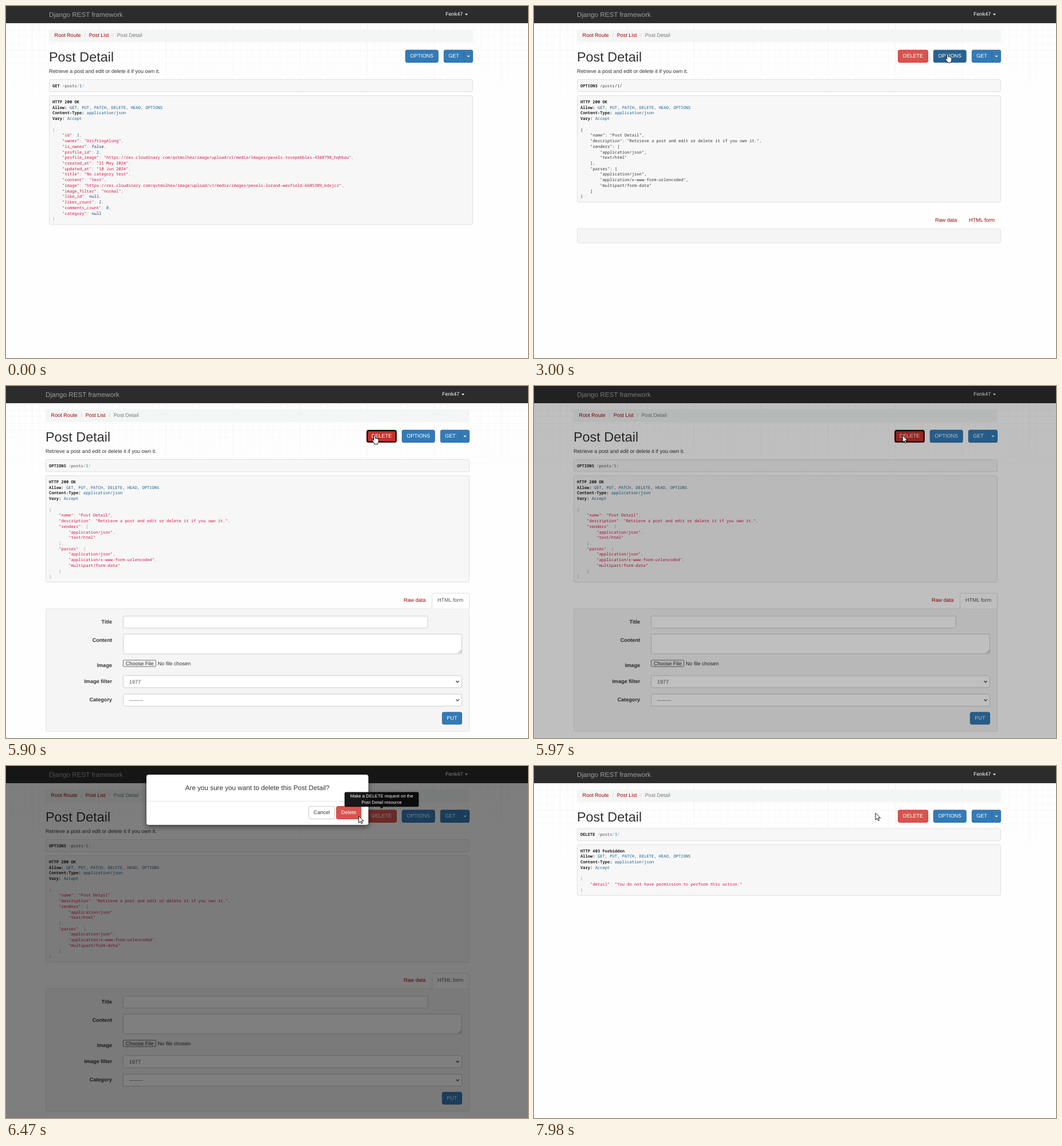
An HTML page for the animation above (8000 ms loop, 911 by 615 pixels).

```html
<!DOCTYPE html>
<html lang="en">
<head>
<meta charset="utf-8">
<title>Post Detail</title>
<style>
  html, body { margin: 0; width: 100%; height: 100%; overflow: hidden; background: #fefefe; }
  svg { display: block; }
  text { font: 9.09px "Liberation Sans", Arial, sans-serif; fill: #333; text-rendering: geometricPrecision; white-space: pre; }
  .mid { text-anchor: middle; }
  .end { text-anchor: end; }
  .b { font-weight: bold; }
  .white { fill: #fff; }
  .link { fill: #a30000; }
  .tip { font-size: 7.79px; }
  .code { font: 7.135px "Noto Sans Mono", "Liberation Mono", monospace; fill: #48484c; }
  .code .b { fill: #222; }
  .str { fill: #d14; }
  .lit { fill: #195f91; }
  .kwd { fill: #1e347b; }
  .pun { fill: #93a1a1; }
  .plain .str, .plain .pun, .plain .num { fill: #333; }
</style>
</head>
<body>
<svg id="stage" width="911" height="615" viewBox="0 0 911 615"></svg>
<script>
const LOOP = 8000;
const BLUE = ['#337ab7', '#286090', '#204d74'];
const RED = ['#d9534f', '#c9302c', '#ac2925'];

// ---- drawing helpers
const text = (x, y, s, cls = '', extra = '') => `<text x="${x}" y="${y}" class="${cls}" ${extra}>${s}</text>`;
const box = (x, y, w, h, fill, stroke = 'none', r = 2.6, extra = '') =>
  `<rect x="${x}" y="${y}" width="${w}" height="${h}" rx="${r}" fill="${fill}" stroke="${stroke}" ${extra}/>`;
const line = (x1, y1, x2, y2, c) => `<path d="M${x1} ${y1}L${x2} ${y2}" stroke="${c}"/>`;
const caret = (x, y) => `<path d="M${x - 2.6} ${y}h5.2l-2.6 2.6z" fill="#fff"/>`;
const group = (id, body, extra = '') => `<g id="${id}" ${extra}>${body}</g>`;
const button = (id, x, y, w, h, label, fill, stroke, cls = 'white') =>
  box(x, y, w, h, fill, stroke, 2.6, `id="${id}"`) + text(x + w / 2, y + h / 2 + 2.7, label, cls + ' mid');

// ---- code blocks
const TOKEN = /("[^"]*")|(\d+)|(true|false|null)|([{}\[\]:,\/]+)/g;
const paint = s => s.replace(TOKEN, (m, str, num, kwd) =>
  `<tspan class="${str ? 'str' : num ? 'lit num' : kwd ? 'kwd' : 'pun'}">${m}</tspan>`);
const bold = s => `<tspan class="b">${s}</tspan>`;
const lit = s => `<tspan class="lit">${s}</tspan>`;
const pre = (y, h, lines) => box(75.5, y, 739, h, '#f7f7f7', '#dfdfe2') +
  lines.map((s, i) => text(81, y + 13.2 + i * 9.735, s, 'code', 'xml:space="preserve"')).join('');

function response(y, method, status, data) {
  const lines = [
    bold('HTTP ' + status),
    bold('Allow:') + lit(' GET, PUT, PATCH, DELETE, HEAD, OPTIONS'),
    bold('Content-Type:') + lit(' application/json'),
    bold('Vary:') + lit(' Accept'), '',
    ...JSON.stringify(data, null, 4).split('\n').map(paint)
  ];
  return pre(y, 21.2, [bold(method) + ' ' + paint('/posts/1/')]) +
    pre(y + 28.2, lines.length * 9.735 + 11, lines);
}

const media = 'https://res.cloudinary.com/qvtmolhea/image/upload/v1/media/images/';
const post = {
  id: 1, owner: 'DriftingAlong', is_owner: false, profile_id: 2,
  profile_image: media + 'pexels-tovepebbles-4348798_hqhbau',
  created_at: '21 May 2024', updated_at: '10 Jun 2024',
  title: 'No category test', content: 'test',
  image: media + 'pexels-lorand-wexfield-6605309_kdxjcz',
  image_filter: 'normal', like_id: null, likes_count: 2, comments_count: 0, category: null
};
const intro = 'Retrieve a post and edit or delete it if you own it.';
const options = {
  name: 'Post Detail', description: intro,
  renders: ['application/json', 'text/html'],
  parses: ['application/json', 'application/x-www-form-urlencoded', 'multipart/form-data']
};
const denied = { detail: 'You do not have permission to perform this action.' };

// ---- page parts
function grid() {
  let s = '';
  for (let i = 0; i < 78; i++) {
    const x = Math.round(45 + (i - 4) * 11.7) + .5;
    s += line(x, 30, x, 178, i % 10 === 4 ? '#ededed' : '#f7f7f7');
  }
  for (let i = 0; i < 10; i++) {
    const y = Math.round(30 + i * 11.7) + .5;
    s += line(0, y, 911, y, i === 9 || i === 4 ? '#f2f2f2' : '#f7f7f7');
  }
  return `<defs><linearGradient id="fade" x2="0" y2="1"><stop stop-color="#fefefe" stop-opacity="0"/>
    <stop offset="1" stop-color="#fefefe"/></linearGradient>
    <filter id="shadow" x="-10%" y="-30%" width="120%" height="180%">
    <feDropShadow dx="0" dy="3" stdDeviation="5" flood-opacity=".5"/></filter></defs>` +
    s + '<rect y="30" width="911" height="150" fill="url(#fade)"/>';
}

const navbar = text(75, 18.8, 'Django REST framework', '', 'style="font-size:11.68px;fill:#9d9d9d"') +
  text(797.3, 17.4, 'Fenk47', 'white end') + caret(803.5, 13.6);

const header = box(75, 41, 740, 22.3, '#f4f5f5') +
  text(84.6, 54, 'Root Route', 'link') + text(136.6, 54, '/', '', 'style="fill:#ccc"') +
  text(144.7, 54, 'Post List', 'link') + text(185.6, 54, '/', '', 'style="fill:#ccc"') +
  text(193.8, 54, 'Post Detail', '', 'style="fill:#777"') +
  text(75, 97, 'Post Detail', '', 'style="font-size:23.4px"') +
  group('remove', button('removeBtn', 635.5, 77, 52, 21.5, 'DELETE', RED[0], '#d43f3a')) +
  button('optionsBtn', 697.2, 77, 57, 21.5, 'OPTIONS', BLUE[0], '#2e6da4') +
  box(764.3, 77, 50.3, 21.5, BLUE[0], '#2e6da4') + line(799.2, 77, 799.2, 98.5, '#2e6da4') +
  text(781.6, 90.4, 'GET', 'white mid') + caret(807, 86.8);

const field = (y, h, w = 591) => box(204.5, y, w, h, '#fff', '#ccc');
const select = (y, value) => field(y, 21) + text(215, y + 13.7, value, '', 'style="fill:#555"') +
  `<path d="M785.5 ${y + 9.3}l2.6 2.6 2.6-2.6" fill="none" stroke="#333" stroke-width="1.3"/>`;
const labels = [['Title', 415], ['Content', 447], ['Image', 491.3], ['Image filter', 519], ['Category', 551]];

const tabs = `<path d="M743.5 389v-24.4q0-2.6 2.6-2.6h60q2.6 0 2.6 2.6v24.4" fill="#fefefe" stroke="#ddd"/>`;
const form = labels.map(([s, y]) => text(185, y, s, 'b end')).join('') +
  field(402, 21, 531.5) + field(433.5, 34.5) +
  '<path d="M789 467l6-6M792 467l3-3" stroke="#777" stroke-width=".8"/>' +
  box(204.5, 479, 57, 11.3, '#efefef', '#767676', 1) + text(209, 488, 'Choose File') + text(264.8, 488, 'No file chosen') +
  select(506, '1977') + select(538.3, '--------') +
  button('put', 761.3, 570, 34.2, 21, 'PUT', BLUE[0], '#2e6da4');

const modal = box(245, 15, 387.5, 88, '#fff', 'rgba(0,0,0,.2)', 4, 'filter="url(#shadow)"') +
  text(438.7, 42, 'Are you sure you want to delete this Post Detail?', 'mid', 'style="font-size:11.68px"') +
  line(245, 61.5, 632.5, 61.5, '#e5e5e5') +
  button('cancel', 528.5, 70.5, 45, 22, 'Cancel', '#fff', '#ccc', '') +
  button('confirm', 576.7, 70.5, 43, 22, 'Delete', RED[0], '#d43f3a');

const tooltip = (id, x, method) => group(id,
  box(x - 64.8, 45.4, 129.6, 25.8, '#000') + `<path d="M${x - 3.2} 71.2h6.4l-3.2 3.4z"/>` +
  text(x, 55.4, `Make a ${method} request on the`, 'tip white mid') +
  text(x, 66.1, 'Post Detail resource', 'tip white mid'));

const ring = (id, x, y, w, h) => box(x, y, w, h, 'none', '#000', 2.6, `id="${id}" stroke-width="2"`);

const arrow = '<path id="arrow" d="M0 0V11.8L2.8 9.2 4.7 13.3 6.5 12.5 4.7 8.5H8.5Z" fill="#fff" stroke="#000" stroke-width=".9"/>';
const hand = `<path id="hand" d="M-1.3 .8Q0-.8 1.3 .8V5Q2.6 4.2 3.4 5.4 4.6 4.7 5.3 6 6.9 5.7 6.9 7.4V10.4
  Q6.9 12.4 5.7 13.4V15H-.6V13.6Q-2.4 11.4-3.8 8.9-4.2 7.3-2.8 7.2L-1.3 8.7Z" fill="#fff" stroke="#000" stroke-width=".9"/>`;

const $ = id => document.getElementById(id);
$('stage').innerHTML =
  '<rect width="911" height="615" fill="#fefefe"/>' + grid() +
  '<rect width="911" height="30" fill="#2c2c2c"/>' + group('nav', navbar) +
  group('page', header + text(75, 117.4, intro, '', 'id="intro"') +
    group('getView', response(128.5, 'GET', '200 OK', post)) +
    group('optionsView', response(128.5, 'OPTIONS', '200 OK', options)) +
    group('deniedView', response(109.2, 'DELETE', '403 Forbidden', denied))) +
  group('forms', box(75.5, 389, 739, 25, '#f5f5f5', '#e3e3e3', 2.6, 'id="well"') +
    group('tab', tabs, 'transform="translate(6 0)"') +
    text(700, 377.3, 'Raw data', 'link') + text(759, 377.3, 'HTML form', 'link', 'id="tabLabel"')) +
  group('form', form) +
  '<rect id="shade" width="911" height="615"/>' + ring('removeRing', 630.5, 78, 50, 19.5) +
  group('modal', modal + ring('confirmRing', 577.5, 71.5, 41.5, 20)) +
  ring('optionsRing', 698, 78, 55.5, 19.5) +
  tooltip('optionsTip', 725.7, 'OPTIONS') + tooltip('removeTip', 655.6, 'DELETE') +
  group('cursor', arrow + hand);

// ---- timing: the screen only refreshes on these steps [start, end, count]
const STEPS = [
  [0, 0, 1], [260, 1030, 12], [1100, 1380, 5], [1510, 1580, 2], [2130, 2340, 4], [2470, 2540, 2],
  [3000, 3070, 2], [3730, 4150, 7], [5010, 5430, 7], [5850, 5970, 3], [6050, 6610, 9],
  [6680, 7170, 8], [7370, 7720, 6], [7980, 7980, 1]
];
function snap(t) {
  const [a, b, n] = STEPS.filter(s => s[0] <= t).pop();
  if (t >= b) return b;
  const d = (b - a) / (n - 1);
  return a + Math.floor((t - a) / d + 1e-6) * d;
}

const PATH = [
  [260, 862, 603], [540, 800, 420], [750, 652, 260], [890, 690, 160], [1030, 745, 101],
  [1170, 738, 94], [1380, 727, 87], [1580, 722, 84], [3660, 722, 84], [3800, 715, 108],
  [4150, 661.7, 219], [4940, 661.7, 219], [5010, 651.8, 209], [5220, 645, 108], [5290, 644, 94],
  [5430, 643.3, 86.5], [6330, 643.3, 86.5], [6470, 615.5, 87.5], [6540, 604, 92], [6610, 594, 92],
  [6750, 582.5, 90], [6960, 588, 85], [7170, 596, 82.3], [8000, 596, 82.3]
];
function cursorAt(t) {
  const i = Math.max(1, PATH.findIndex(p => p[0] > t));
  const [a, x, y] = PATH[i - 1], [b, u, v] = PATH[i];
  const k = Math.max(0, (t - a) / (b - a));
  return [x + (u - x) * k, y + (v - y) * k];
}

const clamp = v => Math.min(1, Math.max(0, v));
const ramp = (t, start, span) => clamp((t - start) / span);
const within = (t, a, b) => t >= a && t < b;
const show = (id, on) => { $(id).style.display = on ? '' : 'none'; };
const shift = (id, x, y = 0) => $(id).setAttribute('transform', `translate(${x} ${y})`);
const level = (pressed, hover) => pressed ? 2 : hover ? 1 : 0;

function render(time) {
  const t = snap(time);
  const formReady = within(t, 3070, 7980);
  const denied = t >= 7980;
  const dx = formReady ? -6 : 0;

  shift('nav', within(t, 3070, 5900) ? -6 : 0);
  ['page', 'forms'].forEach(id => shift(id, dx));
  show('getView', t < 3000);
  show('optionsView', within(t, 3000, 7980));
  $('optionsView').setAttribute('class', formReady ? '' : 'plain');
  show('deniedView', denied);
  show('intro', !denied);
  show('remove', t >= 3000);
  show('forms', within(t, 3000, 7980));
  show('form', formReady);
  show('tab', formReady);
  $('well').setAttribute('height', formReady ? 214.5 : 25);
  $('tabLabel').style.fill = formReady ? '#555' : '';

  const onOptions = within(t, 1100, 3800), onRemove = within(t, 5290, 6050), onConfirm = within(t, 6540, 7980);
  const pressOptions = within(t, 2340, 2470), pressConfirm = within(t, 7370, 7580);
  $('optionsBtn').setAttribute('fill', BLUE[level(pressOptions, onOptions)]);
  $('removeBtn').setAttribute('fill', RED[level(false, onRemove)]);
  $('confirm').setAttribute('fill', RED[level(pressConfirm, onConfirm)]);
  show('optionsRing', pressOptions);
  show('removeRing', within(t, 5850, 6050));
  show('confirmRing', pressConfirm);

  $('shade').style.opacity = denied ? 0 : .5 * ramp(t, 5895, 150);
  const slide = ramp(t, 6050, 300);
  show('modal', within(t, 6060, 7980));
  $('modal').style.opacity = ramp(t, 6050, 150);
  shift('modal', 0, -26 * (1 - slide) ** 2);

  $('optionsTip').style.opacity = t < 3000 ? .9 * ramp(t, 2085, 150) : 0;
  $('removeTip').style.opacity = .9 * ramp(t, 6290, 150) * (1 - ramp(t, 7400, 150));

  const useHand = onOptions || within(t, 5290, 5900) || onConfirm;
  show('cursor', t >= 260);
  show('arrow', !useHand);
  show('hand', useHand);
  shift('cursor', ...cursorAt(t));
}

function tick() {
  render(performance.now() % LOOP);
  requestAnimationFrame(tick);
}
tick();
</script>
</body>
</html>
```
